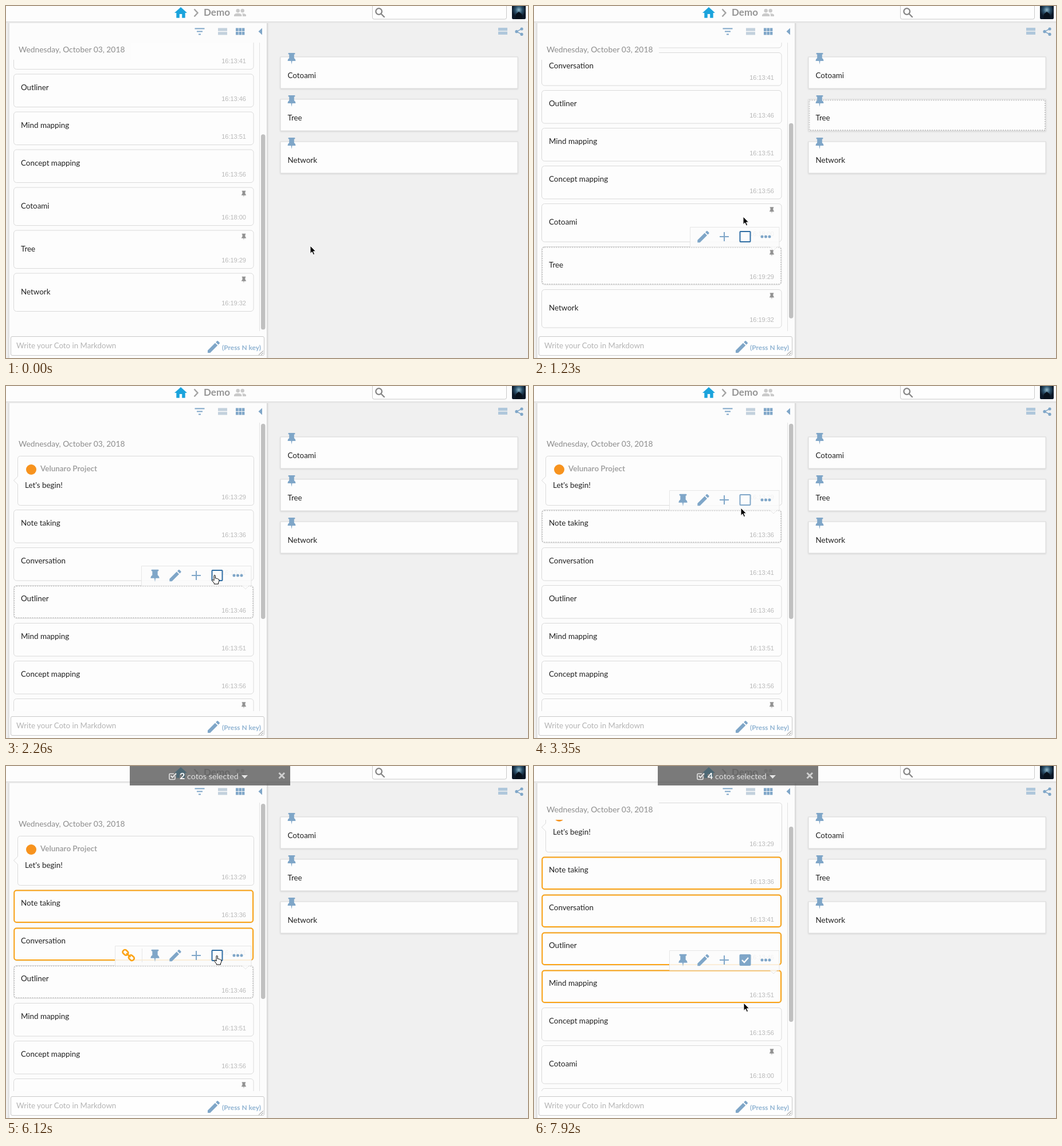
Write an HTML page that moves like this. It is 911 px wide and 615 px high and loops after 8 s.

```html
<!DOCTYPE html>
<html lang="en">
<head>
<meta charset="utf-8">
<title>Cards</title>
<style>
html, body { margin: 0; height: 100%; overflow: hidden; background: #f0f0f0; }
svg { display: block; width: 911px; height: 615px; cursor: default; }
text { font: 13.4px Lato, sans-serif; fill: #222; }
.time { font: 11px "Liberation Sans", Arial, sans-serif; fill: #b8b8b8; text-anchor: end; }
.date { font-size: 13.8px; fill: #8c8c8c; }
.hint { font-size: 13.3px; fill: #b4b4b4; }
.bold { font-weight: 700; }
.card { fill: #fdfdfd; stroke: #dadada; }
.mark { fill: none; stroke: none; stroke-width: 2; }
.hover { stroke: #c6c6c6; stroke-dasharray: 2 2; }
.selected { stroke: #fca314; }
.blue { fill: #7fa6c8; }
.line { fill: none; stroke: #7fa6c8; stroke-width: 2; }
</style>
</head>
<body>
<svg viewBox="0 0 911 615">
  <defs>
    <path id="pin" d="M-5-10H5Q6-10 6-8.7T5-7.500H4.300V-1Q7 .5 7 4H1L0 10-1 4H-7Q-7 .5-4.300-1V-7.500H-5Q-6-7.500-6-8.700T-5-10Z"/>
    <path id="pencil" transform="translate(-12 -12)" d="M3 17.250V21h3.750L17.810 9.940l-3.750-3.750zM20.710 7.040q.6-.7 0-1.410l-2.340-2.340q-.7-.6-1.410 0l-1.830 1.830 3.750 3.750z"/>
    <path id="bars" d="M0 0h16v5.300H0zM0 6.700h16V12H0z"/>
    <clipPath id="list"><rect x="7" y="64" width="447" height="504"/></clipPath>
    <linearGradient id="edge">
      <stop stop-color="#d4d4d4"/><stop offset="1" stop-color="#f0f0f0"/>
    </linearGradient>
    <radialGradient id="photo" cy=".35">
      <stop stop-color="#8fb9cb"/><stop offset=".5" stop-color="#2d536e"/><stop offset="1" stop-color="#0b1828"/>
    </radialGradient>
    <filter id="soft" x="-5%" y="-20%" width="110%" height="150%">
      <feDropShadow dx="0" dy="1" stdDeviation="1" flood-opacity=".14"/>
    </filter>
  </defs>

  <rect width="911" height="615" fill="#f0f0f0"/>
  <rect x="455" y="28" width="4" height="587" fill="url(#edge)"/>
  <rect x="3" y="28" width="3" height="587" fill="#e3e3e3"/>
  <rect x="6" y="28" width="449" height="587" fill="#fcfcfc"/>

  <g id="pinned"></g>

  <g clip-path="url(#list)">
    <path d="M442.5 64V568" stroke="#e2e2e2"/>
    <g id="cards"></g>
    <g id="date">
      <rect x="11" y="-12" width="207" height="30" fill="#fcfcfc"/>
      <text class="date" x="22" y="4.5">Wednesday, October 03, 2018</text>
    </g>
    <rect id="thumb" x="445" width="7.5" height="341" rx="3.7"/>
  </g>

  <g id="tools">
    <path id="toolBox" fill="#fcfcfc" fill-opacity=".85" stroke="#e6e6e6"/>
    <g id="link" fill="none" stroke="#fca314">
      <path d="M237.5-29V-5" stroke="#e6e6e6"/>
      <g transform="translate(213.7 -17.5) rotate(42)" stroke-width="2.7">
        <rect x="-12" y="-3.8" width="10" height="7.6" rx="3.3"/>
        <rect x="2" y="-3.8" width="10" height="7.6" rx="3.3"/>
        <path d="M-5 0H5"/>
      </g>
    </g>
    <use id="toolPin" href="#pin" class="blue" transform="translate(260 -16.5) scale(1.08)"/>
    <use href="#pencil" class="blue" transform="translate(295.5 -17) scale(1.13)"/>
    <path class="line" d="M324-17h16M332-25v16"/>
    <rect id="box" x="359.5" y="-26" width="18" height="18" rx="1" stroke-width="2"/>
    <path id="tick" d="M363-17l4 4 7-8" fill="none" stroke="#fff" stroke-width="2.4"/>
    <path d="M398-17h0m6.5 0h0m6.5 0h0" class="line" style="stroke-width:5;stroke-linecap:round"/>
  </g>

  <g class="blue">
    <path d="M329.5 38.5h17v2h-17zM333 43.5h10v2h-10zM336 48.5h4v2h-4z"/>
    <use href="#bars" x="370" y="38.5" fill="#c3d1dd"/>
    <path class="line" d="M401 41.2h15.4M401 47.7h15.4" style="stroke-width:5.4;stroke-dasharray:4.6 .8"/>
    <path d="M447 38.5v12l-6.500-6z"/>
    <use href="#bars" x="859" y="38" fill="#afc7db"/>
    <path class="line" d="M900 40l-9 4.7 9 4.6" style="stroke-width:1.5"/>
    <circle cx="900" cy="40" r="2.6"/><circle cx="891" cy="44.7" r="2.6"/><circle cx="900" cy="49.4" r="2.6"/>
  </g>

  <g>
    <rect x="8.5" y="577.5" width="442" height="33" rx="2.5" fill="#fefefe" stroke="#c8c8c8"/>
    <text class="hint" x="18" y="598">Write your Coto in Markdown</text>
    <use href="#pencil" class="blue" transform="translate(362.5 595.5) scale(1.17)"/>
    <text class="bold" x="377" y="600.5" style="font-size:11.9px;fill:#8fb3d2">(Press N key)</text>
    <path d="M441 609.5l8-7M445 609.5l4-3.5" stroke="#888"/>
  </g>

  <g>
    <rect y="27" width="911" height="3" fill="#e9e9e9"/>
    <rect width="911" height="27" fill="#fdfdfd"/>
    <path d="M0 27.5H911" stroke="#dcdcdc"/>
    <path transform="translate(291.8 -1.3) scale(1.1)" fill="#1aa3dc" d="M10 20v-6h4v6h5v-8h3L12 3 2 12h3v8z"/>
    <path d="M328.5 5.5l6 6.5-6 6.5" fill="none" stroke="#a2a2a2" stroke-width="2.4"/>
    <text class="bold" x="345" y="17.3" style="font-size:17px;fill:#959595">Demo</text>
    <g fill="#cacaca">
      <circle cx="404.7" cy="8.3" r="3.2"/><circle cx="412.7" cy="8.3" r="3.2"/>
      <path d="M398 18v-2.5q1-2.6 6.7-2.8 5.6.2 6.6 2.8V18zM413 18v-2.5q0-1.4-1-2.6 6 0 7 2.6V18z"/>
    </g>
    <rect x="639.5" y="-4" width="234" height="27" rx="3" fill="#fefefe" stroke="#c9c9c9"/>
    <g fill="none" stroke="#858585" stroke-width="2.3">
      <circle cx="650.7" cy="9.5" r="5.3"/><path d="M654.7 13.7l6 6"/>
    </g>
    <rect x="883" y="-2" width="24" height="25" rx="2" fill="url(#photo)"/>
    <path d="M889 23l1-9 5-4 5 4 1 9z" fill="#08111c"/>
  </g>

  <g id="banner">
    <rect x="216" width="280" height="34" fill="#5a5a5a" fill-opacity=".8"/>
    <g id="check" fill="none" stroke="#e4e4e4" stroke-width="1.6">
      <path d="M11 18v4q0 1.5-1.5 1.5h-7q-1.5 0-1.5-1.5v-7q0-1.5 1.5-1.5H9"/>
      <path d="M3.5 17l3 3 6.5-7" stroke-width="2.2"/>
    </g>
    <text id="count" class="bold" y="22.5" style="font-size:16px;fill:#fff"></text>
    <text id="label" y="22.5" style="font-size:14.3px;fill:#e2e2e2"></text>
    <path id="caret" d="M0 16h11l-5.5 6z" fill="#e4e4e4"/>
    <path d="M476.5 12l9.5 9.5m0-9.5l-9.5 9.5" stroke="#cfcfcf" stroke-width="3"/>
  </g>

  <g id="cursor">
    <path id="arrow" d="M0 0V13.5l3.1-2.9 2.2 5 2.3-1-2.200-4.800H9.600z" stroke="#fff"/>
    <path id="hand" d="M-1 1.2Q0-.6 1.3 1.2V6q2-.8 2.5.6 1.7-.6 2.3.8 1.8-.3 1.9 1.6 0 3-1.500 5v2H-.7v-1.500Q-3 12-4.500 9.300q.5-1.700 2-.6L-1 10z" fill="#fff" stroke="#000"/>
  </g>
</svg>

<script>
const $ = id => document.getElementById(id);
const LOOP = 8000, FIRST_CLICK = 3780, CLICK_GAP = 1200, PICKS = 4;
const BOX_X = 368, BOX_UP = 17;   // checkbox: x, and height above its card
const SETTLE = 150;               // hover follows a scroll this much later

const cards = [
  ["Let's begin!", "16:13:29"], ["Note taking", "16:13:36"], ["Conversation", "16:13:41"],
  ["Outliner", "16:13:46"], ["Mind mapping", "16:13:51"], ["Concept mapping", "16:13:56"],
  ["Cotoami", "16:18:00"], ["Tree", "16:19:29"], ["Network", "16:19:32"]
].map(([text, time], i) => ({ text, time, pinned: i > 5, height: i > 5 ? 67 : i ? 58 : 86 }));

let nextTop = 122;
for (const c of cards) {
  c.top = nextTop;
  nextTop += c.height + 8;
}

// scroll flicks: start, duration, distance
const flicks = [[780, 340, -28.5], [1420, 160, -85.5], [1680, 160, -65.5], [1930, 180, -50], [7600, 320, 58]];

// cursor stops: time, x, y
const stops = [[0, 531, 419], [200, 531, 419], [410, 522, 420], [910, 366, 403], [1120, 366, 403],
  [1350, 364, 330], [2260, 364, 330], [2580, 446, 262], [2700, 446, 262], [3050, 352, 246]];
for (let i = 0; i < PICKS; i++) {
  const click = FIRST_CLICK + CLICK_GAP * i, y = cards[i + 1].top - BOX_UP;
  stops.push([click - 430, 361, y + 14], [click - 250, BOX_X, y], [click + 300, BOX_X, y]);
}
stops.push([7920, 366, 414]);

const clamp = v => Math.min(1, Math.max(0, v));
const scrollBy = progress => flicks.reduce((sum, f) => sum + f[2] * progress(f), 229.5);
const scrollAt = t => scrollBy(([start, time]) => clamp((t - start) / time) ** 2);
const settledAt = t => scrollBy(([start, time]) => t >= start + time + SETTLE ? 1 : 0);

function cursorAt(t) {
  const i = stops.findLastIndex(s => s[0] <= t);
  const a = stops[i], b = stops[i + 1] || a;
  const p = clamp((t - a[0]) / (b[0] - a[0] || 1));
  return [a[1] + (b[1] - a[1]) * p, a[2] + (b[2] - a[2]) * p];
}

const move = (id, x, y) => $(id).setAttribute("transform", `translate(${x} ${y})`);
const show = (id, on) => { $(id).style.display = on ? "" : "none"; };
const rect = (cls, x, y, w, h, rx = 0) =>
  `<rect class="${cls}" x="${x}" y="${y}" width="${w}" height="${h}" rx="${rx}"/>`;

const bubble = `<path class="card" d="M25.5 122.5H427.5q5 0 5 5V203.5q0 5-5 5H25.5q-5 0-5-5V172l-7-7 7-7V127.5q0-5 5-5z"/>
  <circle cx="44" cy="146" r="9" fill="#f7931e"/>
  <text class="bold" x="60" y="149" style="fill:#a3a3a3">Velunaro Project</text>
  <text x="33" y="178">${cards[0].text}</text>`;

$("cards").innerHTML = cards.map(({ text, time, top, height, pinned }, i) => {
  const body = i ? rect("card", 13.5, top + .5, 418.5, height - .5, 5) +
    rect("mark", 14.3, top + 1.5, 416.7, height - 2.5, 4) +
    `<text x="26" y="${top + (pinned ? 37 : 28)}">${text}</text>` : bubble + rect("mark", 0, 0, 0, 0);
  const pin = pinned ? `<use href="#pin" fill="#929292" transform="translate(415 ${top + 12}) scale(.57)"/>` : "";
  return `${body}${pin}<text class="time" x="419" y="${top + height - 10.5}">${time}</text>`;
}).join("");

$("pinned").innerHTML = cards.filter(c => c.pinned).map((c, i) => {
  const y = 89 + 74 * i;
  return `<g filter="url(#soft)">${rect("card", 479, y, 414, 55)}</g>
    ${rect("mark", 480.5, y + 1.5, 411.5, 52.5)}
    <use href="#pin" class="blue" transform="translate(498.5 ${y + 3})"/>
    <text x="491.5" y="${y + 37}">${c.text}</text>`;
}).join("");

const marks = [...document.querySelectorAll("#cards .mark")];
const pinMarks = [...document.querySelectorAll("#pinned .mark")];

function drawTools(hover, count, hot, scroll) {
  show("tools", hover > 0);
  if (hover < 1) return;
  const { top, pinned } = cards[hover];
  const checked = hover <= count, linkable = count > 0 && !checked;
  const left = pinned ? 272.5 : linkable ? 190.5 : 236.5;
  const color = hot ? "#2f6da3" : "#7fa6c8";
  move("tools", 0, top - scroll);
  $("toolBox").setAttribute("d", `M${left}-33.5H428V1H424l-6 6-6-6H${left}z`);
  show("link", linkable);
  show("toolPin", !pinned);
  show("tick", checked);
  $("box").setAttribute("stroke", color);
  $("box").setAttribute("fill", checked ? color : "none");
}

function drawBanner(t, count) {
  show("banner", count);
  const shift = count > 1 ? -3 : 0;
  move("banner", 0, -34 * (1 - clamp((t - FIRST_CLICK) / 270)));
  move("check", 287 + shift, 0);
  move("caret", 408 - shift, 0);
  $("count").setAttribute("x", 306 + shift);
  $("label").setAttribute("x", 319 + shift);
  $("count").textContent = count;
  $("label").textContent = count > 1 ? "cotos selected" : "coto selected";
}

function draw(t) {
  const scroll = scrollAt(t), settled = settledAt(t);
  const [x, y] = cursorAt(t);
  const count = Math.max(0, Math.floor((t - FIRST_CLICK) / CLICK_GAP) + 1);
  // a card's hover area starts at the toolbar above it
  const hover = x < 432 ? cards.findLastIndex(c => c.top - 33 <= y + settled) : -1;
  const onBox = offset => hover > 0 && Math.abs(x - BOX_X) < 10 &&
    Math.abs(y - (cards[hover].top - BOX_UP - offset)) < 10;

  move("cards", 0, -scroll);
  move("date", 0, Math.max(76, 101 - scroll));
  $("thumb").setAttribute("y", 66 + scroll * .69);
  $("thumb").setAttribute("fill", x > 443 && x < 454 ? "#a8a8a8" : "#c0c0c0");

  marks.forEach((el, i) => el.setAttribute("class", "mark" +
    (i && i <= count ? " selected" : i === hover ? " hover" : "")));
  pinMarks.forEach((el, i) => el.setAttribute("class", "mark" + (i + 6 === hover ? " hover" : "")));
  drawTools(hover, count, onBox(settled), scroll);
  drawBanner(t, count);

  show("hand", onBox(scroll));
  show("arrow", !onBox(scroll));
  move("cursor", x, y);
}

let start;
function tick(now) {
  start ??= now;
  draw((now - start) % LOOP);
  requestAnimationFrame(tick);
}
draw(0);
requestAnimationFrame(tick);
</script>
</body>
</html>
```
